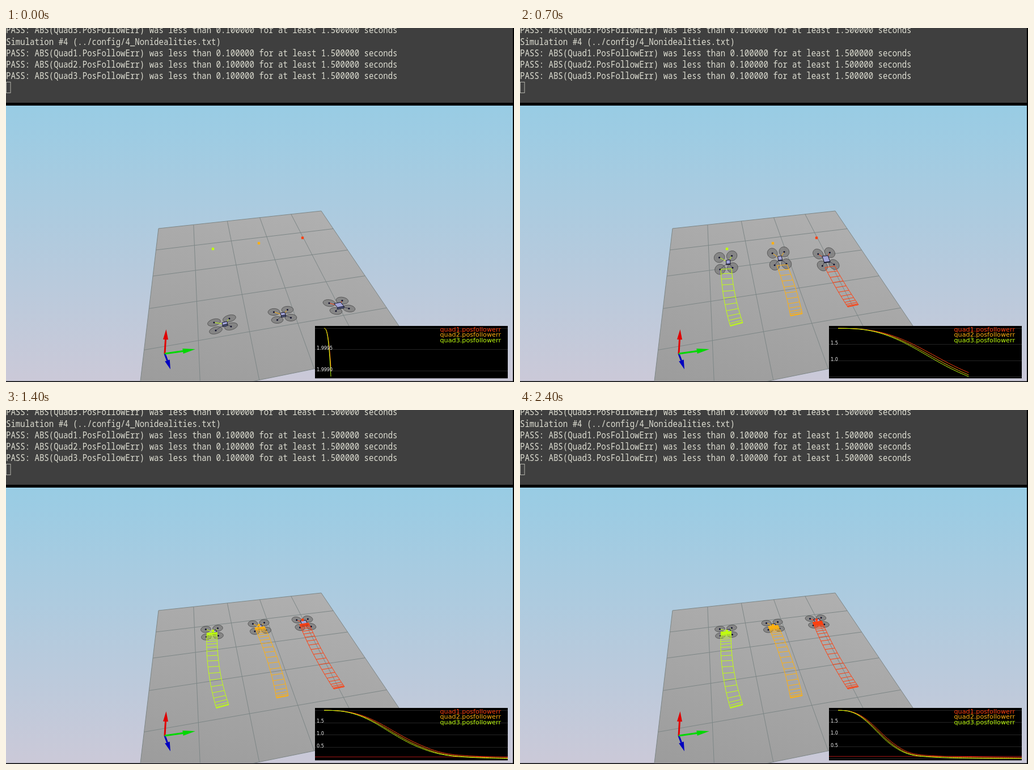
Animation of 896x625 px, one loop 2.5 s. Source, as an HTML page:

```html
<!DOCTYPE html>
<html lang="en">
<head>
<meta charset="utf-8">
<title>Three drones</title>
<style>
  html, body { margin: 0; width: 100%; height: 100%; overflow: hidden; background: #000; }
  svg { display: block; width: 896px; height: 625px; }
  .term { font: 17px "Noto Sans Mono", "DejaVu Sans Mono", monospace; fill: #deded2; white-space: pre; }
  .legend { font: 11.2px "DejaVu Sans", sans-serif; }
  .tick { font: 8px "DejaVu Sans", sans-serif; fill: #eee; }
  .thin { fill: none; stroke-width: 1; }
  .level { fill: none; shape-rendering: crispEdges; }
  .rotor { fill: #808080; fill-opacity: .85; stroke: #404040; stroke-width: .7; }
</style>
</head>
<body>
<svg viewBox="0 0 896 625">
  <defs>
    <linearGradient id="sky" x2="0" y2="1">
      <stop stop-color="#98cce4"/><stop offset="1" stop-color="#cbc9d8"/>
    </linearGradient>
    <linearGradient id="floor" x1=".7" x2=".3" y2="1">
      <stop stop-color="#b0b0b0"/><stop offset="1" stop-color="#9c9c9c"/>
    </linearGradient>
    <clipPath id="view"><path d="M0 137H894V623.5H0Z"/></clipPath>
    <clipPath id="plot"><path d="M545 526H885V618H545Z"/></clipPath>
  </defs>
  <rect width="896" height="625"/>
  <rect width="894" height="132" fill="#3f3f3f"/>
  <g id="terminal" class="term" transform="scale(.8265 1)"></g>
  <rect x=".5" y="95.5" width="7.5" height="19" fill="none" stroke="#b4b4ac"/>
  <g clip-path="url(#view)">
    <rect y="136" width="894" height="488" fill="url(#sky)"/>
    <g id="ground"></g>
    <g id="gizmo"></g>
    <g id="drones"></g>
    <g id="trails"></g>
    <g id="targets"></g>
  </g>
  <rect x="545" y="526" width="340" height="92.5"/>
  <g clip-path="url(#plot)">
    <g id="chart"></g>
    <g id="legend" class="legend"></g>
  </g>
</svg>
<script>
const $ = id => document.getElementById(id);
const mix = (a, b, k) => a + (b - a) * k;
const num = v => v.toFixed(2);
const path = pts => 'M' + pts.map(p => p.map(num).join(' ')).join('L');

// Smooth monotone curve through [x, y] points
function curve(pts) {
  const n = pts.length;
  const slope = pts.slice(1).map((p, i) => (p[1] - pts[i][1]) / (p[0] - pts[i][0]));
  const tangent = pts.map((_, i) => {
    if (i === 0) return slope[0];
    if (i === n - 1) return slope[n - 2];
    const a = slope[i - 1], b = slope[i];
    return a * b <= 0 ? 0 : 2 * a * b / (a + b);
  });
  return x => {
    if (x <= pts[0][0]) return pts[0][1] + (x - pts[0][0]) * tangent[0];
    let i = 0;
    while (i < n - 2 && x > pts[i + 1][0]) i++;
    const h = pts[i + 1][0] - pts[i][0], s = Math.min(1, (x - pts[i][0]) / h), r = 1 - s;
    return r * r * (1 + 2 * s) * pts[i][1] + s * r * r * h * tangent[i]
         + s * s * (3 - 2 * s) * pts[i + 1][1] - s * s * r * h * tangent[i + 1];
  };
}

// Follow error falls from 2 as 2·exp(-L); L is smooth in log-log space
const LEAD = .385;
const DECAY_TIMES = [LEAD, 3.385, 7.385, 10.385, 14.4, 18.4, 24.4];
function errorCurve(decay) {
  const f = curve(decay.map((d, i) => [Math.log(DECAY_TIMES[i]), Math.log(d)]));
  return t => t <= 0 ? 2 : 2 * Math.exp(-Math.exp(f(Math.log(t))));
}

const pitch = curve([[0, 7], [3, 1.8], [5, 6.5], [7, 10.5], [10, 7.8], [14, 6.6], [24, 5.9]]);

const drones = [
  { name: 'quad1', color: '#ff4010', from: [587.5, 490.5], to: [523, 370.5], bow: -16, depth: 1,
    right: [11.5, -2.2, 9.75, -.8], lean: [-6, -2.75], rung: [9.5, -2, 8, -1.2],
    body: .5, shift: [0, 0], target: [523, 370.5], error: errorCurve([.00045, .155, 1.155, 2.35, 3, 3.3, 3.7]) },
  { name: 'quad2', color: '#ffb010', from: [487.5, 506.5], to: [446, 380.5], bow: 17, depth: .68,
    right: [12, -2, 10, -1], lean: [-3, -1.7], rung: [10.5, -2, 8.5, -1],
    body: .33, shift: [1, 0], target: [446, 380], error: errorCurve([.0005, .177, 1.27, 2.6, 3.5, 4.05, 4.9]) },
  { name: 'quad3', color: '#c0ff10', from: [382, 523.5], to: [363.5, 391], bow: -24, depth: .62,
    right: [13.5, -3.5, 10.5, -1], lean: [-1.5, -.5], rung: [11, -3, 9, -.5],
    body: .32, shift: [4, -.5], target: [365, 390], error: errorCurve([.000565, .195, 1.366, 2.75, 3.77, 4.46, 5]) },
];

// Screen position of a drone, with its share of the way done
function place(d, t) {
  const p = 1 - d.error(t) / 2, k = p / (p + (1 - p) * d.depth);
  return { k, x: mix(d.from[0], d.to[0], k) + d.bow * k * (1 - k), y: mix(d.from[1], d.to[1], k) };
}

function trail(d, t) {
  const step = .5, left = [], right = [];
  let rungs = '';
  for (let s = 0; s <= t - .4; s += step) {
    const { k, x, y } = place(d, s);
    const dx = mix(d.rung[0], d.rung[2], k), dy = mix(d.rung[1], d.rung[3], Math.min(1, k * 2));
    left.push([x - dx, y - dy]);
    right.push([x + dx, y + dy]);
    rungs += path([left.at(-1), right.at(-1)]);
  }
  if (!left.length) return '';
  return `<path class="thin" stroke="${d.color}" d="${path(left)}${path(right)}${rungs}"/>`;
}

function drone(d, t, frame) {
  const { k, x, y } = place(d, t);
  const R = [mix(d.right[0], d.right[2], k), mix(d.right[1], d.right[3], k)];
  const F = [mix(d.lean[0], d.lean[1], k), -pitch(frame)];
  if (F[1] > -4) F[0] *= .5;
  const at = (u, v) => [x + u * R[0] + v * F[0], y + u * R[1] + v * F[1]];
  const rotors = [[-1, 1], [1, 1], [1, -1], [-1, -1]].map(([u, v]) => at(u, v));
  const centre = at(0, 0).map((c, i) => c + d.shift[i]);
  const arm = (p, color) => `<path class="thin" stroke="${color}" d="${path([centre, p])}"/>`;
  const disc = ([cx, cy]) => `<circle class="rotor" r=".84" vector-effect="non-scaling-stroke"
    transform="matrix(${[...R, ...F, cx, cy].map(num)})"/>`;
  const motor = ([cx, cy]) => `<circle cx="${num(cx)}" cy="${num(cy)}" r="1.5" fill="#10102c"/>`;
  const lift = 4 * Math.sqrt(1 - Math.min(1, (F[1] / 11) ** 2));
  const face = h => [[-1, 1], [1, 1], [1, -1], [-1, -1]].map(([u, v]) => {
    const p = at(u * d.body, v * d.body);
    return [p[0] + d.shift[0], p[1] + d.shift[1] + h];
  });
  const top = face(-lift / 2), base = face(lift / 2);
  return rotors.map(disc).join('')
    + rotors.map((p, i) => arm(p, i < 2 ? d.color : '#4a4a58')).join('')
    + rotors.map(motor).join('')
    + `<path fill="#50587c" stroke="#141428" stroke-width=".9" d="${path([top[3], top[2], base[2], base[3]])}Z"/>`
    + `<path fill="#a2a4d8" stroke="#141428" stroke-width="1" d="${path(top)}Z"/>`;
}

function chart(t) {
  const low = Math.min(...drones.map(d => d.error(t)));
  const range = 2 - low, yOf = e => 530.3 + 85 * (2 - e) / range;
  const span = t * 31.2, xScale = 31.2 * Math.min(1, 324 / span);
  const power = Math.floor(Math.log10(range / 5)), step = 5 * 10 ** power;
  const digits = Math.max(1, -power);
  const line = (y, color) => `<path class="level" stroke="${color}" d="M545 ${Math.floor(y) + .5}H885"/>`;
  let out = '', ticks = '';
  for (let i = 0; yOf(2 - i * step) < 617; i++) {
    const value = 2 - i * step, y = yOf(value);
    out += line(y, '#242424');
    if (i && y < 612) ticks += `<text class="tick" x="548" y="${num(y + .4)}">${value.toFixed(digits)}</text>`;
  }
  if (yOf(.1) < 618) out += line(yOf(.1), '#a01414');
  const samples = 90;
  for (const d of drones) {
    const pts = Array.from({ length: samples + 1 }, (_, i) => {
      const s = t * i / samples;
      return [561 + s * xScale, yOf(d.error(s))];
    });
    out += `<path class="thin" stroke="${d.color}" d="${path(pts)}"/>`;
  }
  return out + ticks;
}

function drawStatic() {
  const pass = n => `PASS: ABS(Quad${n}.PosFollowErr) was less than 0.100000 for at least 1.500000 seconds`;
  $('terminal').innerHTML = [pass(3), 'Simulation #4 (../config/4_Nonidealities.txt)', pass(1), pass(2), pass(3)]
    .map((s, i) => `<text y="${9.3 + i * 20.3}">${s}</text>`).join('');

  // Perspective map of the unit square onto the floor
  const g = .0985, h = -.445;
  const floor = (u, v) => {
    const w = 1 + g * u + h * v;
    return [(269 + 341.8 * u - 140.2 * v) / w, (354 + .8 * u + 15.1 * v) / w];
  };
  let grid = '';
  for (let i = 0; i <= 5; i++) {
    grid += path([floor(i / 5, 0), floor(i / 5, 1)]) + path([floor(0, i / 5), floor(1, i / 5)]);
  }
  $('ground').innerHTML =
    `<path fill="url(#floor)" d="${path([floor(0, 0), floor(1, 0), floor(1, 1), floor(0, 1)])}Z"/>
     <path class="thin" stroke="#7d8686" stroke-width=".8" d="${grid}"/>`;

  const arrow = (color, x, y, tipX, tipY) => {
    const len = Math.hypot(tipX - x, tipY - y), nx = -(tipY - y) / len * 4.5, ny = (tipX - x) / len * 4.5;
    return `<path stroke="${color}" stroke-width="3" d="M280 575L${x} ${y}"/>
      <path fill="${color}" d="${path([[x + nx, y + ny], [tipX, tipY], [x - nx, y - ny]])}Z"/>`;
  };
  $('gizmo').innerHTML = arrow('#e00000', 281.5, 550, 282.5, 532)
    + arrow('#0000c0', 284.5, 587, 290, 602.5) + arrow('#00d800', 312, 570.5, 334, 567);

  $('targets').innerHTML = drones.map(({ color, target: [x, y] }) =>
    `<rect x="${x - 2.2}" y="${y - 2.2}" width="4.4" height="4.4" rx="1" fill="${color}"/>`).join('');
  $('legend').innerHTML = drones.map((d, i) =>
    `<text x="765.5" y="${535.5 + i * 9.5}" fill="${d.color}">${d.name}.posfollowerr</text>`).join('');
}

function render(ms) {
  const frame = Math.floor(ms % 2500 / 100), t = frame + LEAD;
  $('trails').innerHTML = drones.map(d => trail(d, t)).join('');
  $('drones').innerHTML = drones.map(d => drone(d, t, frame)).join('');
  $('chart').innerHTML = chart(t);
}

drawStatic();
const start = performance.now();
function tick() {
  render(performance.now() - start);
  requestAnimationFrame(tick);
}
tick();
</script>
</body>
</html>
```
